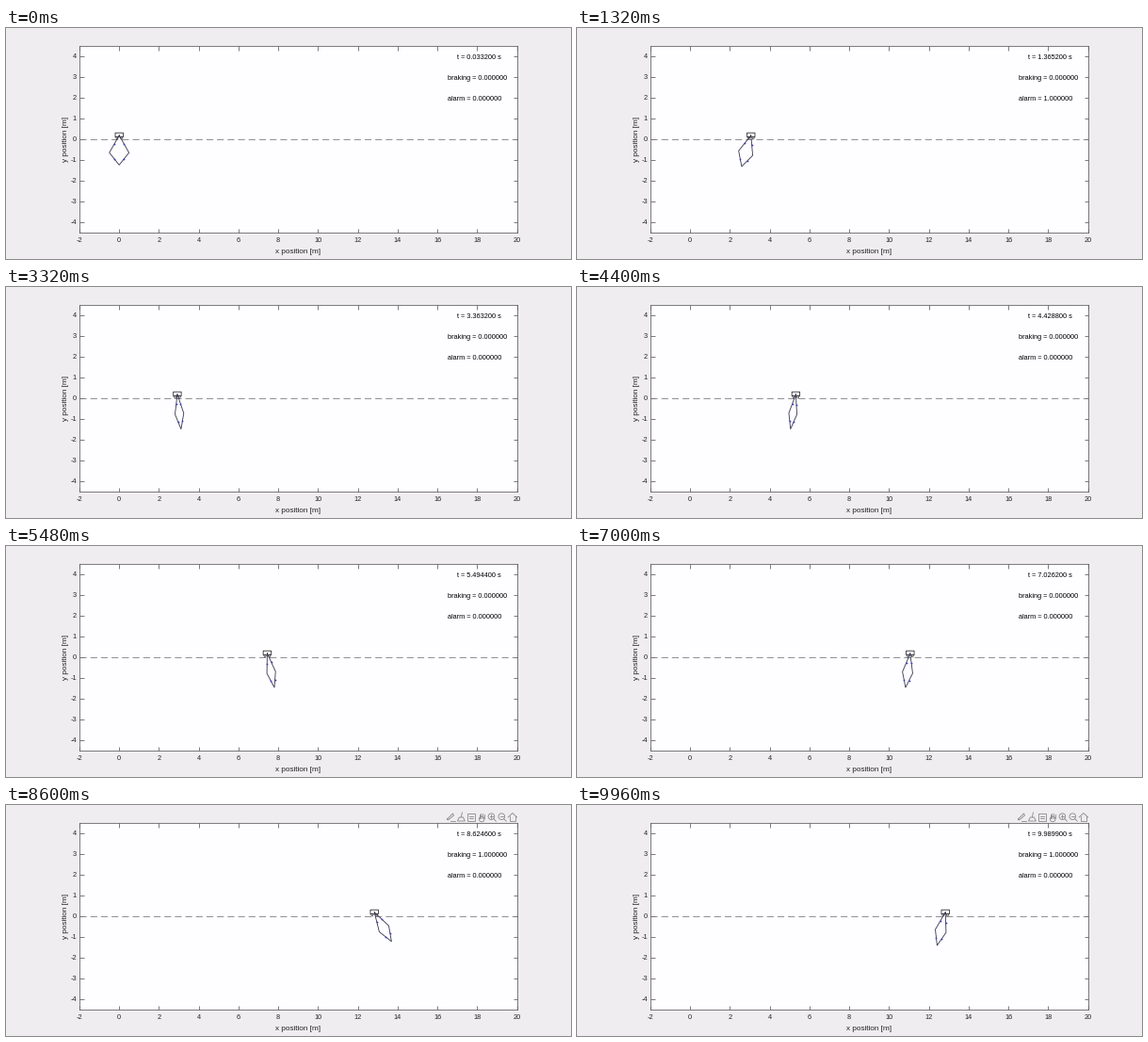
Animation, 600 px wide and 245 px high, one loop 10000 ms. Source, as a matplotlib script:

```python
import numpy as np
import matplotlib.pyplot as plt
from matplotlib.animation import FuncAnimation
from matplotlib.patches import Circle, Polygon, Rectangle

plt.rcParams["font.family"] = "Liberation Sans"
plt.rcParams["axes.unicode_minus"] = False

W, H, DPI = 600, 245, 100
PX = 72 / DPI  # points per pixel
FRAMES, INTERVAL, STEP = 250, 40, 0.0333
INK, EDGE, LINK, DOT, ICON = "#262626", "#5e5e5e", "#34344f", "#3a3ac4", "#858585"

UPPER, LOWER, PIVOT = 0.97, 0.77, 0.18  # link lengths and hinge height, m
T_TURN, X_TURN = 1.82, 3.6              # the cart backs away from here
T_RESTART, T_STOP = 2.96, 7.575         # it sets off again, then locks

# turning points of the load: time in s, angle in degrees
TURNS = [(0, 0), (0.9, -46), (2.07, 38), (2.75, -40), (3.74, 28), (4.8, -23),
         (5.76, 20), (7.1, -8.3), (8.304, 47), (9.509, -47), (10.714, 47)]


def ease(t, t0, t1, a, b):
    """Half a cosine wave from a at t0 to b at t1."""
    return a + (b - a) * (1 - np.cos(np.pi * (t - t0) / (t1 - t0))) / 2


def cruise(t):
    """Steady travel with the recoil of the swinging load."""
    return 2.363 * t - 5.252 - 0.29 * np.cos(2 * np.pi * (t - 5.494) / 1.532)


def cart_x(t):
    if t < T_TURN:
        return ease(t, STEP, T_TURN, 0, X_TURN)
    if t < T_RESTART:
        return ease(t, T_TURN, T_RESTART, X_TURN, cruise(T_RESTART))
    return cruise(min(t, T_STOP))


def load_angle(t):
    for (t0, a), (t1, b) in zip(TURNS, TURNS[1:]):
        if t < t1:
            return ease(t, t0, t1, a, b)


def half_opening(t):
    return 16 + 14.7 * np.exp(-t / 3.4) * np.cos(0.63 * t)


def linkage(t):
    """Hinge, left joint, bottom and right joint of the load."""
    hinge = np.array([cart_x(t), PIVOT])
    mid, half = np.radians(load_angle(t)), np.radians(half_opening(t))

    def reach(length, angle):
        return hinge + length * np.array([np.sin(angle), -np.cos(angle)])

    depth = UPPER * np.cos(half) + np.sqrt(LOWER**2 - (UPPER * np.sin(half)) ** 2)
    return np.array([hinge, reach(UPPER, mid - half), reach(depth, mid),
                     reach(UPPER, mid + half)])


fig = plt.figure(figsize=(W / 100, H / 100), dpi=DPI, facecolor="#efedef")
ax = fig.add_axes([78 / W, 1 - 217 / H, 464.6 / W, 198.4 / H], facecolor="#fefdff")
ax.set(xlim=(-2, 20), ylim=(-4.5, 4.5),
       xticks=range(-2, 21, 2), yticks=range(-4, 5))
ax.tick_params(direction="in", top=True, right=True, length=4.5 * PX,
               width=0.8 * PX, color=EDGE, labelcolor=INK, labelsize=7.4 * PX)
ax.tick_params(axis="x", pad=5 * PX)
ax.tick_params(axis="y", pad=3 * PX)
for spine in ax.spines.values():
    spine.set(linewidth=0.8 * PX, color=EDGE)
ax.plot([-2, 20], [0, 0], color="#787878", lw=0.8 * PX, dashes=(9, 5))

# full-stage layer in pixels for axis labels and toolbar
stage = fig.add_axes([0, 0, 1, 1])
stage.set(xlim=(0, W), ylim=(H, 0))
stage.axis("off")
label = dict(fontsize=8.1 * PX, color=INK, ha="center", va="center")
stage.text(310, 237, "x position [m]", **label)
stage.text(63.3, 118, "y position [m]", rotation=90, **label)

readout = dict(fontsize=7.4 * PX, color="black", va="center")
clock = ax.text(17, 3.92, "", **readout)
braking = ax.text(16.5, 2.92, "", **readout)
alarm = ax.text(16.5, 1.91, "", **readout)

links, = ax.plot([], [], color=LINK, lw=0.85 * PX, solid_joinstyle="round")
dots, = ax.plot([], [], "o", color=DOT, ms=1.8 * PX, mew=0)
body = ax.add_patch(Rectangle((0, 0.1), 0.4, 0.2, fill=False, snap=False,
                              ec="#202020", lw=0.8 * PX))
wheels = [ax.add_patch(Circle((0, 0.05), 0.05, fill=False,
                              ec="#202020", lw=0.6 * PX)) for _ in range(2)]


def make_toolbar():
    parts = []
    pencil, brush, page, hand, zoom_in, zoom_out, home = 472.5 + 10.9 * np.arange(7)

    def stroke(x, *points):
        xs, ys = np.array(points).T
        parts.extend(stage.plot(x + xs, 13 + ys, color=ICON, lw=0.8 * PX))

    def shape(patch):
        patch.set(fill=False, edgecolor=ICON, linewidth=0.8 * PX)
        parts.append(stage.add_patch(patch))

    stroke(pencil, (-4, 2), (2, -4), (3, -2), (-3, 3), (-4, 2))
    stroke(pencil, (-1, 4), (4, 4))
    stroke(brush, (1, -5), (0, 0))
    shape(Polygon([(brush - 2, 13), (brush + 2, 13), (brush + 4, 17), (brush - 4, 17)]))
    shape(Rectangle((page - 4, 9), 8, 8))
    for y in (-1, 1):
        stroke(page, (-2, y), (2, y))
    shape(Circle((hand, 15), 2.8))
    for x in (-2.4, -0.8, 0.8, 2.4):
        stroke(hand, (x, 1), (x, abs(x) / 2 - 4.5))
    for x in (zoom_in, zoom_out):
        shape(Circle((x - 0.7, 12.2), 3.3))
        stroke(x, (1.7, 1.6), (4.3, 4.2))
        stroke(x, (-2.4, -0.8), (1, -0.8))
    stroke(zoom_in, (-0.7, -2.5), (-0.7, 0.9))
    stroke(home, (-4.7, 0), (0, -4.4), (4.7, 0))
    stroke(home, (-3, -1), (-3, 4), (3, 4), (3, -1))
    return parts


toolbar = make_toolbar()


def update(k):
    t = STEP * (1 + round(1.2 * k)) - 0.0001
    pts = linkage(t)
    loop = np.vstack([pts, pts[:1]])
    links.set_data(*loop.T)
    dots.set_data(*((loop[1:] + loop[:-1]) / 2).T)

    x = pts[0, 0]
    body.set_x(x - 0.2)
    for wheel, dx in zip(wheels, (-0.11, 0.11)):
        wheel.center = (x + dx, 0.05)

    clock.set_text(f"t = {t:.6f} s")
    braking.set_text(f"braking = {float(t >= T_STOP):.6f}")
    alarm.set_text(f"alarm = {float(1.1 < t < 2.5):.6f}")
    for part in toolbar:
        part.set_visible(t >= T_STOP)
    return []


anim = FuncAnimation(fig, update, frames=FRAMES, interval=INTERVAL,
                     repeat=True, repeat_delay=0, blit=False)
plt.show()
```
